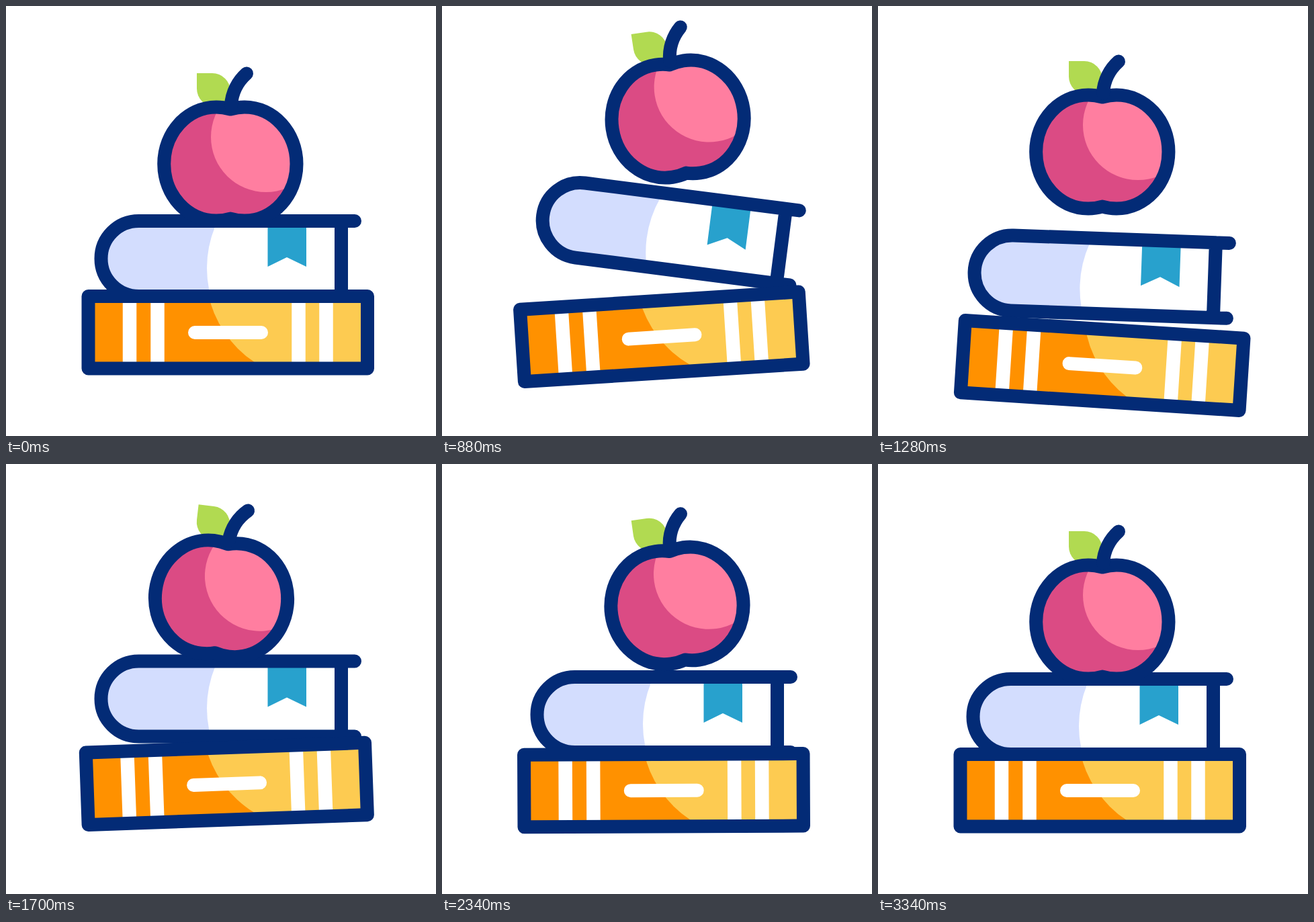
An HTML page that plays this animation: 640x640 px, repeating every 3560 ms.

```html
<!DOCTYPE html>
<html lang="en">
<head>
<meta charset="utf-8">
<title>Apple on books</title>
<style>
  html, body { margin: 0; width: 100%; height: 100%; overflow: hidden; background: #fff; }
  svg { display: block; width: 100vw; height: 100vh; }
  .line { fill: none; stroke: #032b76; stroke-width: 20; stroke-linecap: round; stroke-linejoin: round; }
  #rays { fill: none; stroke: #fdcb51; stroke-width: 20; stroke-linecap: round; }
</style>
</head>
<body>
<svg viewBox="0 0 640 640">
  <defs>
    <path id="pages" d="M499 320H197.5a56 56 0 0 0 0 112H499Z"/>
    <path id="fruit" d="M334 153.5Q323 150.5 313 150.5C270 150.5 235.2 188.4 235.2 235S270 319.5 313 319.5Q324 319.5 334 316.5Q344 319.5 355 319.5C397.8 319.5 432.5 281.6 432.5 235S397.8 150.5 355 150.5Q345 150.5 334 153.5Z"/>
    <rect id="cover" x="122.5" y="432" width="415.5" height="107.5"/>
    <clipPath id="inPages"><use href="#pages"/></clipPath>
    <clipPath id="inFruit"><use href="#fruit"/></clipPath>
    <clipPath id="inCover"><use href="#cover"/></clipPath>
  </defs>

  <g id="book">
    <use href="#pages" fill="#d3ddfe"/>
    <circle cx="461" cy="390" r="162" fill="#fff" clip-path="url(#inPages)"/>
    <path d="M389.5 320H447V388L418 374L389.5 388Z" fill="#28a1cd"/>
    <path class="line" d="M519 320H197.5a56 56 0 0 0 0 112H519M499 320V432"/>
  </g>

  <g id="box">
    <use href="#cover" fill="#ff9100"/>
    <path d="M460 232.5A162.5 162.5 0 0 0 460 557.5H560V232.5Z" fill="#fdcb51" clip-path="url(#inCover)"/>
    <path d="M184 432v107M225.5 432v107M435.5 432v107M476.5 432v107" stroke="#fff" stroke-width="20.5"/>
    <path d="M281 486H380" stroke="#fff" stroke-width="20" stroke-linecap="round"/>
    <use href="#cover" class="line"/>
  </g>

  <g id="apple">
    <path d="M284 100H307A27 27 0 0 1 334 127V150H311A27 27 0 0 1 284 123Z" fill="#b1da51"/>
    <use href="#fruit" fill="#db4b84"/>
    <circle cx="387" cy="195" r="82" fill="#ff7ea0" clip-path="url(#inFruit)"/>
    <use href="#fruit" class="line"/>
    <path class="line" d="M335 148C336 129 345 112 358 100.5"/>
  </g>

  <path id="rays"/>
</svg>
<script>
const LOOP = 3560, START = 340;
const $ = id => document.getElementById(id);

// Eased 0 to 1 between two times.
function ease(t, from, to) {
  const u = Math.min(1, Math.max(0, (t - from) / (to - from)));
  return u * u * (3 - 2 * u);
}

// Swings from rest through the given [time, value] turning points, back to rest at end.
function swing(t, turns, end) {
  let from = START, value = 0;
  for (const [to, next] of [...turns, [end, 0]]) {
    if (t < to) return value + (next - value) * ease(t, from, to);
    [from, value] = [to, next];
  }
  return 0;
}

function pose(id, lift, tilt, pivot) {
  $(id).setAttribute('transform', `translate(0 ${lift}) rotate(${tilt} ${pivot})`);
}

// Three rays fan out from one centre, growing outward and then leaving outward.
function fan(t) {
  const inner = 41.3, length = 33.7;
  const head = inner + length * ease(t, 2540, 2740);
  const tail = inner + length * ease(t, 2980, 3340);
  if (head <= tail) return '';
  return [17, 51.5, 86].map(degrees => {
    const a = degrees * Math.PI / 180;
    const at = r => `${409 + r * Math.cos(a)} ${169.5 - r * Math.sin(a)}`;
    return `M${at(tail)}L${at(head)}`;
  }).join('');
}

function draw(now) {
  const t = now % LOOP;
  pose('box',
    swing(t, [[724, -13], [1169, 55], [1794, -14]], 2365),
    swing(t, [[710, -5], [1450, 5], [1842, -5]], 2420), [330, 539.5]);
  pose('book',
    swing(t, [[755, -60], [1175, 30], [1935, -43]], 2420),
    swing(t, [[735, 8]], 1550), [330, 432]);
  pose('apple',
    swing(t, [[905, -66], [1440, -5], [1980, -66]], 2580),
    swing(t, [[910, -8.7], [1630, 8], [2080, -12]], 2760), [334, 120]);
  $('rays').setAttribute('d', fan(t));
  requestAnimationFrame(draw);
}
draw(performance.now());
</script>
</body>
</html>
```
